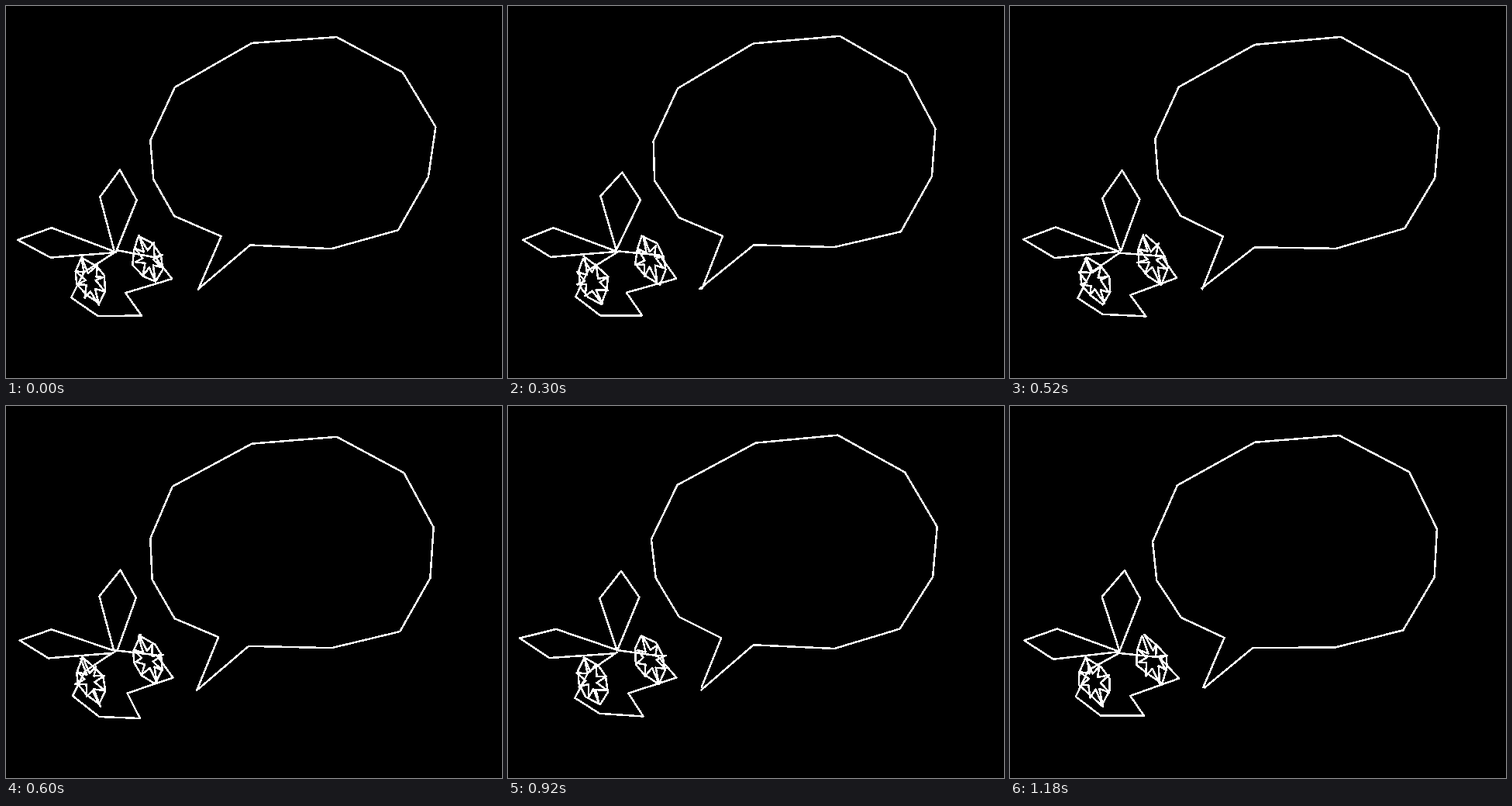
Recreate the animation shown at these times as an HTML page. Size 640 px wide and 480 px high, loop 1200 ms.

```html
<!DOCTYPE html>
<html lang="en">
<head>
<meta charset="utf-8">
<title>Wobbly fly</title>
<style>
  html, body { margin: 0; width: 100%; height: 100%; overflow: hidden; background: #000; }
  svg { display: block; }
  path { fill: none; stroke: #fff; stroke-width: 2.5; stroke-linejoin: round; shape-rendering: crispEdges; }
</style>
</head>
<body>
<svg width="640" height="480"><path/></svg>
<script>
const LOOP = 1200, STEP = 20, WOBBLE = 2.3;
const path = document.querySelector('path');
const nose = [141, 317];

const close = points => [...points, points[0]];

const bubble = close([[248, 366], [315, 310], [422, 312], [507, 289], [546, 220], [553, 157], [513, 87],
  [426, 39], [318, 48], [217, 104], [186, 173], [190, 224], [219, 273], [276, 298]]);
const head = close([nose, [194, 323], [216, 350], [155, 372], [174, 401], [119, 399], [86, 375], [102, 342]]);

// Kite from the nose to a point (dx, dy) away, widest at two thirds
function wing(dx, dy, halfWidth) {
  const [x, y] = nose, k = halfWidth / Math.hypot(dx, dy);
  const side = s => [x + dx * 0.67 - s * dy * k, y + dy * 0.67 + s * dx * k];
  return close([nose, side(-1), [x + dx, y + dy], side(1)]);
}

// Slanted oval with slightly pointed ends
function eyePoint([x, y], angle, scale) {
  const long = scale * (Math.cos(angle) + 0.15 * Math.cos(3 * angle));
  const wide = scale * Math.sin(angle);
  return [x - 9.5 * long + 18 * wide, y - 26.7 * long - 5.4 * wide];
}

const ring = (count, point) => close(Array.from({ length: count }, (_, i) => point(i, i * 2 * Math.PI / count)));

const eye = center => [
  ring(8, (i, angle) => eyePoint(center, angle, 1)),
  ring(16, (i, angle) => eyePoint(center, angle, i % 2 ? 0.4 : 1))
];

const lines = [bubble, head, wing(5, -104, 24.5), wing(-124, -16, 19.5),
  ...eye([109, 355]), ...eye([183.5, 327])];

// Repeatable noise in 0..1
function seeded(seed) {
  let s = seed;
  return () => {
    s = (s + 0x6D2B79F5) | 0;
    let t = Math.imul(s ^ (s >>> 15), 1 | s);
    t = (t + Math.imul(t ^ (t >>> 7), 61 | t)) ^ t;
    return ((t ^ (t >>> 14)) >>> 0) / 4294967296;
  };
}

function draw(step) {
  const random = seeded(step * 7919 + 17);
  const shake = v => (v + (random() * 2 - 1) * WOBBLE).toFixed(1);
  const trace = line => 'M' + line.map(p => p.map(shake)).join('L');
  path.setAttribute('d', lines.map(trace).join(''));
}

function tick() {
  draw(Math.floor(performance.now() % LOOP / STEP));
  requestAnimationFrame(tick);
}
tick();
</script>
</body>
</html>
```
